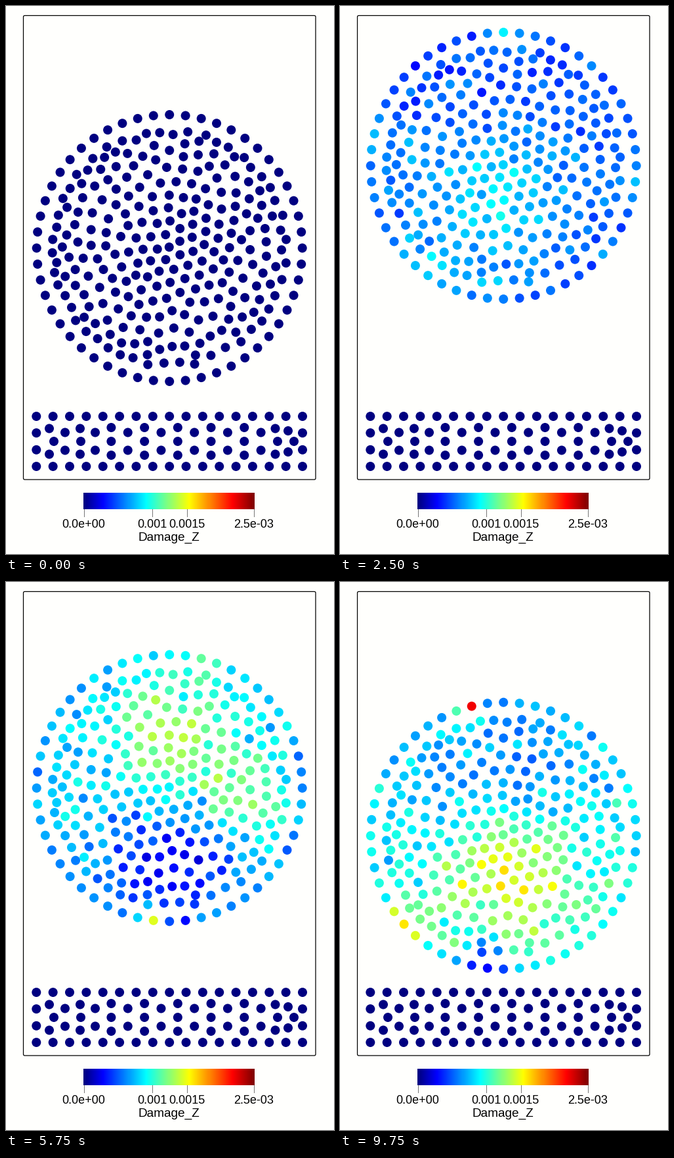
Animation of 500 by 832 pixels, one loop 10 s. Source, as a matplotlib script:

```python
import numpy as np
import matplotlib.pyplot as plt
from matplotlib.animation import FuncAnimation
from matplotlib.colors import LinearSegmentedColormap
from matplotlib.patches import FancyBboxPatch

W, H, DPI = 500, 832, 100
FRAMES, INTERVAL = 40, 250
CX, CY, R = 249.2, 367.5, 202.5
N_RIM, N_INNER = 52, 245
FLOOR = 391

rng = np.random.default_rng(7)
JET = LinearSegmentedColormap.from_list("jet_like", [
    (0, "#000080"), (.111, "#0000ff"), (.365, "#00ffff"),
    (.619, "#ffff00"), (.873, "#ff0000"), (1, "#800000")])


def sq_dist(grid, p):
    return ((grid - p) ** 2).sum(axis=1)


def disc_nodes():
    """Even rim; each inner node goes into the widest void, then relaxes."""
    a = np.arange(N_RIM) * 2 * np.pi / N_RIM
    pts = list(R * np.column_stack([np.sin(a), -np.cos(a)]))
    axis = np.arange(-190, 191, 2.0)
    grid = np.stack(np.meshgrid(axis, axis), -1).reshape(-1, 2)
    grid = grid[np.hypot(*grid.T) < 186]
    grid += rng.uniform(-1, 1, grid.shape)
    near = np.min([sq_dist(grid, p) for p in pts], axis=0)
    while len(pts) < N_RIM + N_INNER:
        p = grid[near.argmax()]
        pts.append(p)
        near = np.minimum(near, sq_dist(grid, p))
    pts = np.array(pts)
    for _ in range(2):
        owner = np.argmin([sq_dist(grid, p) for p in pts], axis=0)
        for i in range(N_RIM, len(pts)):
            cell = grid[owner == i]
            if len(cell):
                pts[i] = cell.mean(axis=0)
    return pts


def plate_nodes():
    """Regular border with staggered columns mirrored about the middle row."""
    left, right, mid = 46.3, 452, 661
    step = (right - left) / 16
    pts = [(x, y) for x in np.linspace(left, right, 17) for y in (623, 699)]
    pts += [(x, mid + s * 12.8) for x in (left, right) for s in (-1, 1)]
    wide = left + step * (4.5 + 2 * np.arange(5))
    ends = [73, 114, 414, 439]
    pts += [(x, mid) for x in (*ends, *wide)]
    columns = [((66, 113, 410.5), 19.5), (wide, 21),
               ((90, 136, *(wide + step)), 13.5), ((430,), 16)]
    for xs, dy in columns:
        pts += [(x, mid + s * dy) for x in xs for s in (-1, 1)]
    return np.array(pts)


# Damage field at key frames: base level and bumps (x, y, width, amount).
FIELDS = {
    0: (0, []),
    7: (.14, [(0, -195, 38, .28), (-120, 165, 32, .18),
              (201, 30, 25, .2), (-10, 45, 40, .12)]),
    14: (.25, [(-15, 40, 95, .26), (0, -165, 58, -.17),
               (-200, -40, 24, .17), (-28, 195, 20, .22)]),
    23: (.3, [(10, -80, 70, .24), (120, 20, 38, .2),
              (5, 115, 62, -.21), (-28, 195, 11, .4)]),
    28: (.28, [(15, 140, 62, .2), (-28, 194, 14, .5),
               (60, 165, 28, .2), (-82, 0, 28, -.12), (85, 0, 30, -.12)]),
    32: (.27, [(10, 45, 70, .14), (10, 190, 50, .25),
               (-155, 20, 45, -.18), (155, 0, 50, -.15)]),
    39: (.36, [(10, 70, 70, .28), (0, -140, 110, -.13), (-51, -190, 13, .7),
               (-25, 198, 30, -.3), (-162, 132, 24, .3)]),
}

disc, plate = disc_nodes(), plate_nodes()


def sample(base, bumps):
    if not bumps:
        return np.full(len(disc), float(base))
    v = base + .04 * rng.standard_normal(len(disc))
    for x, y, width, amount in bumps:
        v += amount * np.exp(-sq_dist(disc, (x, y)) / (2 * width ** 2))
    return v.clip(.06, .9)


KEYS = np.array(list(FIELDS))
LEVELS = np.array([sample(*f) for f in FIELDS.values()])


def damage(n):
    i = min(np.searchsorted(KEYS, n, side="right") - 1, len(KEYS) - 2)
    u = (n - KEYS[i]) / (KEYS[i + 1] - KEYS[i])
    return (1 - u) * LEVELS[i] + u * LEVELS[i + 1]


def centre_y(n):
    """First fall, then ballistic arcs given by apex time and height."""
    arcs = [h + 3 * (n - t) ** 2
            for t, h in ((10, 242.5), (24.1, 309.2), (34.9, 334.8))]
    return min(CY + 40 * n, FLOOR, *arcs)


plt.rcParams["font.family"] = "Liberation Sans"
fig = plt.figure(figsize=(W / DPI, H / DPI), dpi=DPI, facecolor="#fffffd")
ax = fig.add_axes([0, 0, 1, 1])
ax.axis("off")

ax.imshow(np.linspace(0, 1, 256)[None], cmap=JET, aspect="auto",
          extent=(118, 378.5, 764, 739))
ax.set(xlim=(0, W), ylim=(H, 0))
ax.add_patch(FancyBboxPatch((26.5, 14.5), 445.5, 704.5, fill=False, lw=.9,
                            ec="black",
                            boxstyle="round,pad=0,rounding_size=2"))


def label(x, y, text, px):
    ax.text(x, y, text, fontsize=px * 72 / DPI, ha="center", va="baseline")


for x, text in ((118.5, "0.0e+00"), (223, "0.001"), (275.5, "0.0015"),
                (378, "2.5e-03")):
    ax.plot([x, x], [764, 775], color="#777777", lw=.72)
    label(x, 791.5, text, 18)
label(248, 811.5, "Damage_Z", 19)

dot_style = dict(s=(14 * 72 / DPI) ** 2, cmap=JET, vmin=0, vmax=1,
                 linewidths=0)
ax.scatter(*plate.T, c=np.zeros(len(plate)), **dot_style)
dots = ax.scatter(*(disc + (CX, CY)).T, c=LEVELS[0], **dot_style)


def update(n):
    dots.set_offsets(disc + (CX, centre_y(n)))
    dots.set_array(damage(n))
    return dots,


anim = FuncAnimation(fig, update, frames=FRAMES, interval=INTERVAL,
                     repeat=True, repeat_delay=0)
plt.show()
```
